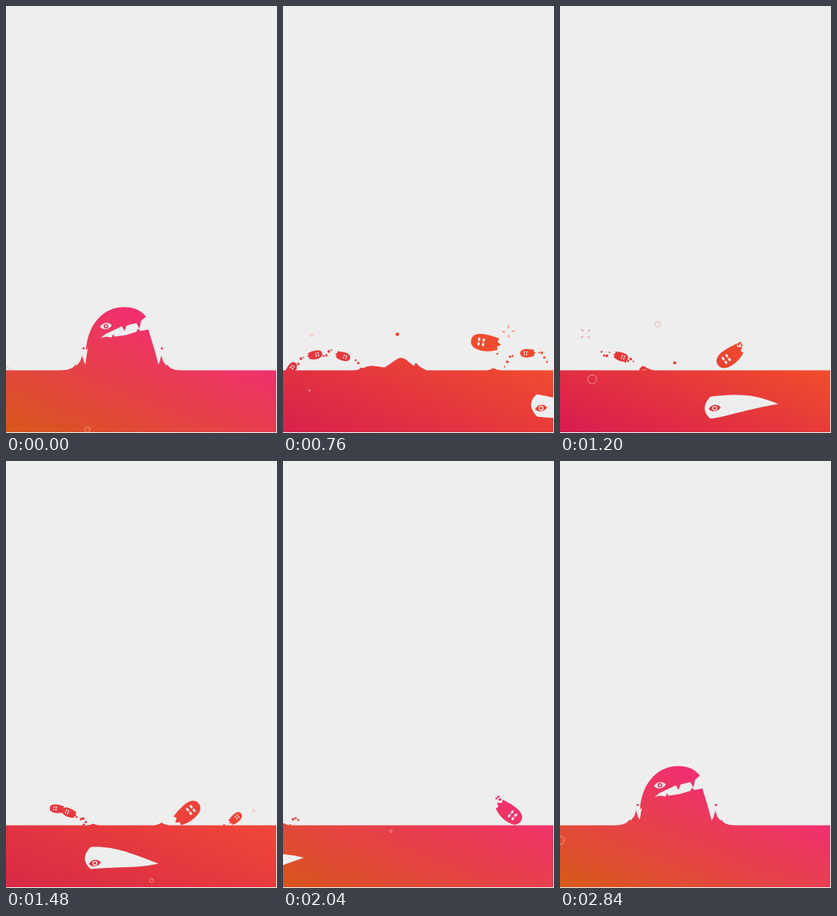
Write an HTML page with a canvas that moves like this. It is 339 px wide and 534 px high and loops after 2.88 s.

```html
<!DOCTYPE html>
<html lang="en">
<head>
<meta charset="utf-8">
<title>Sea monster</title>
<style>
html, body { margin: 0; width: 100%; height: 100%; overflow: hidden; background: #eee; }
canvas { display: block; width: 339px; height: 534px; }
</style>
</head>
<body>
<canvas id="stage" width="339" height="534"></canvas>
<script>
const LOOP = 2880, STEP = 40, SEA = 456, WIDTH = 338, HEIGHT = 533, PAPER = '#eee';
const ctx = document.getElementById('stage').getContext('2d');
let ink;

// Both monster parts are drawn around the jaw hinge
const HEAD = 'M-25 17C-22 -20 0 -37 23 -37C35 -37 44 -33 50 -25' +
  'L44 -20 42 -10 38 -17 26 -14 23 -7 20 -13 -1 -3Z';
const BODY = 'M-28 62C-26 40 -25 20 -20 5L0 0 7 1 9 -3 11 0 25 -2 38 -6 40 -10 43 -7 53 -9' +
  'C58 7 63 22 67 42L69 62Z';
const FISH = 'M11 0C11 -5 6 -6.5 0 -6C-4 -6 -7 -5 -10 -4.5L-9 -2 -12 0 -9 2 -10 4C-6 6 -3 6.5 0 6.5C6 6.5 11 5 11 0Z';
const ALMOND = 'M-8 1C-4 -6 4 -6 8 -1C4 5 -4 6 -8 1Z';
const SKIRT = 'M-32 0C-20 -1 -16 -3 -13 -8L-12 -6 -7 -12 -5 -19 -2 -10 1 -6 1 0Z';
const HUMP = 'M-60 0C-48 -2 -44 -6 -36 -6L-21 -4C-10 -10 -6 -16 0 -16C7 -15 10 -9 16 -6L18 -10 23 -5 32 0Z';

const gap = (t, at) => (t - at + LOOP * 1.5) % LOOP - LOOP / 2;
const clamp = v => Math.max(0, Math.min(1, v));
const ease = v => (v = clamp(v)) * v * (3 - 2 * v);
const bump = (dt, life) => Math.max(0, 1 - (dt / life) ** 2);
const fall = (dt, top, g) => top + g * dt * dt;

function randomizer(seed) {
  return () => (seed = seed * 16807 % 2147483647) / 2147483647;
}

// A row of fish leaping one after another; waits shrink by `hurry`
function school(count, first, wait, hurry, leap) {
  return Array.from({ length: count }, (_, i) =>
    ({ top: 434, half: 360, size: .85, ...leap, apex: first + i * (wait - hurry * i) }));
}

const leaps = [
  ...school(4, 360, 284, 17, { x: 55, speed: .15 }),
  ...school(2, 460, 287, 0, { x: 308, speed: -.15, half: 300 }),
  ...school(1, 880, 0, 0, { x: 242, speed: -.093, top: 418, half: 510, size: 1.65 }),
  ...school(2, 1540, 100, 0, { x: 55, speed: -.15 }),
  ...school(1, 1720, 0, 0, { x: 323, speed: .15 }),
  ...school(1, 1760, 0, 0, { x: 255, speed: .1, top: 418, half: 430, size: 1.65 })
];

const random = randomizer(29);
const bubbles = Array.from({ length: 14 }, (_, i) => ({
  x: random() * WIDTH, at: i * LOOP / 14, r: 1 + random() * 5, speed: .3 + random() * .17
}));

// x, y, peak time
const bursts = [[78, 406, 360], [282, 407, 760], [32, 410, 1200], [104, 438, 1720], [32, 410, 2400]];

// Places the path rather than the context so the gradient stays put
function shape(d, color, x = 0, y = 0, turn = 0, sx = 1, sy = sx) {
  const path = new Path2D();
  path.addPath(new Path2D(d), new DOMMatrix().translate(x, y).rotate(turn).scale(sx, sy));
  ctx.fillStyle = color;
  ctx.fill(path);
}

function dot(x, y, r, color = ink) {
  ctx.fillStyle = color;
  ctx.beginPath();
  ctx.arc(x, y, r, 0, 7);
  ctx.fill();
}

function streak(x, y, dx, dy, width, bend = 0) {
  ctx.strokeStyle = ink;
  ctx.lineWidth = width;
  ctx.lineCap = 'round';
  ctx.beginPath();
  ctx.moveTo(x - dx, y - dy);
  ctx.quadraticCurveTo(x + bend, y, x + dx, y + dy + .01);
  ctx.stroke();
}

function makeInk(t) {
  const k = Math.cos((t - 2480) / LOOP * 2 * Math.PI);
  const g = ctx.createLinearGradient(0, HEIGHT, 69, 354);
  g.addColorStop(0, `rgb(216,${63 + 38 * k},${49 - 34 * k})`);
  g.addColorStop(1, `rgb(241,${60 - 18 * k},${82 + 42 * k})`);
  return g;
}

function eye(x, y, turn, size, white, dark) {
  shape(ALMOND, white, x, y, turn, size);
  dot(x, y, 3.2 * size, dark);
  dot(x, y, 1.4 * size, white);
}

function drawMonster(s) {
  const rise = fall(s - 100, -5, 95 / 420 ** 2);
  if (rise > 100) return;
  const open = ease((s - 40) / 300);
  const turn = -42 * open, angle = turn * Math.PI / 180;
  const x = 125 - 2 * open, y = 413 + rise;
  shape(BODY, ink, x, y);
  shape(HEAD, ink, x, y, turn);
  eye(x + 13 * Math.sin(angle), y - 13 * Math.cos(angle), turn * 1.4, .92, PAPER, ink);

  const skirt = bump(s + 20, 270);
  if (!skirt) return;
  shape(SKIRT, ink, 100, SEA, 0, 1, skirt);
  shape(SKIRT, ink, 190, SEA, 0, -.9, skirt);
  for (const dx of [97, 195]) dot(dx, fall(s - 20, 428, .0006), 1.4);
}

function drawSpit(t) {
  const late = t - 360;
  if (t > 200 && t < 840) {
    const half = Math.max(0, Math.min(13, 13 - late * .06));
    streak(157 - .035 * late, fall(t - 490, 342, .00094), half * .2, -half, 4.5, half * .25);
  }
  if (t > 220 && t < 740) streak(178 + .06 * late, fall(t - 440, 358, .0012), 5, -4, 3.4);
  if (t > 800 && t < 1260) dot(143.5, fall(t - 1000, 415, .00078), 2);
}

function drawFish(t, { apex, x: middle, speed, top, half, size }) {
  const at = time => {
    const u = (time - apex) / half;
    return { u, x: middle + speed * (time - apex), y: fall(u, top, SEA + 8 * size - top) };
  };
  const dir = Math.sign(speed);

  for (let i = 0; i < 4; i++) {
    const p = at(t - 95 - i * 22);
    if (Math.abs(p.u) < 1) dot(p.x, p.y + Math.sin(i * 5 + apex) * 4, 1 + i * 3 % 4 * .25);
  }

  const exit = at(apex + half), lift = 4.5 * size * bump(gap(t, apex + half), 140);
  if (lift) shape('M-12 0Q-4 -.3 0 -1Q4 -.4 12 0Z', ink, exit.x, SEA + .5, 0, 1, lift);

  const { u, x, y } = at(t);
  if (Math.abs(u) >= 1) return;
  const turn = dir * 75 * u * Math.sqrt(Math.abs(u));
  shape(FISH, ink, x, y, turn, dir * size, size);
  ctx.save();
  ctx.translate(x, y);
  ctx.rotate(turn * Math.PI / 180);
  ctx.scale(dir * size, size);
  ctx.fillStyle = PAPER;
  for (const ex of [1.5, 5]) for (const ey of [-1.7, 1.8]) {
    ctx.beginPath();
    ctx.ellipse(ex, ey, .9, 1.4, 0, 0, 7);
    ctx.fill();
  }
  ctx.restore();
}

// Blunt head, tapering tail, and a wave running along the spine
function drawSwimmer(t) {
  const length = 92, nose = 181 - .294 * (t - 1200);
  if (nose > WIDTH || nose < -length) return;
  const phase = .7 + Math.PI * (t - 1200) / 520;
  const edge = (u, side) => {
    const spine = 500 + 4 * Math.cos(phase + 3.4 * u);
    const girth = 14 * Math.sqrt(clamp(u / .08)) * (1 - u ** 2);
    ctx.lineTo(nose + length * u, spine + side * girth);
  };
  ctx.fillStyle = PAPER;
  ctx.beginPath();
  for (let i = 0; i <= 40; i++) edge((i / 40) ** 2, -1);
  for (let i = 40; i >= 0; i--) edge((i / 40) ** 2, 1);
  ctx.fill();
  eye(nose + 12.5, 503, 0, .95, ink, PAPER);
  dot(nose + 12.5, 503, 1.8);
}

function drawBubble(t, { x, at, r, speed }) {
  const y = SEA - speed * gap(t, at);
  if (y < 397 || y > 530) return;
  const wet = y > SEA;
  ctx.globalAlpha = wet ? .6 : .3;
  ctx.strokeStyle = wet ? '#ffd0b8' : ink;
  ctx.lineWidth = 1;
  ctx.beginPath();
  ctx.arc(x, y, r, 0, 7);
  ctx.stroke();
  ctx.globalAlpha = 1;
}

function drawBurst(t, [x, y, at]) {
  const dt = gap(t, at), reach = 6 * (1 + dt / 400);
  ctx.globalAlpha = .9 * bump(dt, 150);
  for (let i = 0; i < 4; i++) {
    const a = at / 500 + i * Math.PI / 2, c = Math.cos(a), s = Math.sin(a);
    streak(x + c * reach, y + s * reach, c * 1.4, s * 1.4, 1);
  }
  ctx.globalAlpha = 1;
}

function draw(t) {
  ctx.fillStyle = PAPER;
  ctx.fillRect(0, 0, WIDTH + 1, HEIGHT + 1);
  ink = makeInk(t);

  ctx.save();
  ctx.beginPath();
  ctx.rect(0, 0, WIDTH, SEA);
  ctx.clip();
  drawMonster(gap(t, 0));
  drawSpit(t);
  const hump = bump(t - 760, 200);
  if (hump) shape(HUMP, ink, 148, SEA, 0, 1, hump);
  leaps.forEach(leap => drawFish(t, leap));
  bursts.forEach(burst => drawBurst(t, burst));
  ctx.restore();

  ctx.save();
  ctx.beginPath();
  ctx.rect(0, 0, WIDTH, HEIGHT);
  ctx.clip();
  ctx.fillStyle = ink;
  ctx.fillRect(0, SEA - .4, WIDTH, HEIGHT);
  drawSwimmer(t);
  bubbles.forEach(bubble => drawBubble(t, bubble));
  ctx.restore();
}

const start = performance.now();
function frame() {
  const t = (performance.now() - start) % LOOP;
  draw(Math.floor(t / STEP) * STEP);
  requestAnimationFrame(frame);
}
frame();
</script>
</body>
</html>
```
